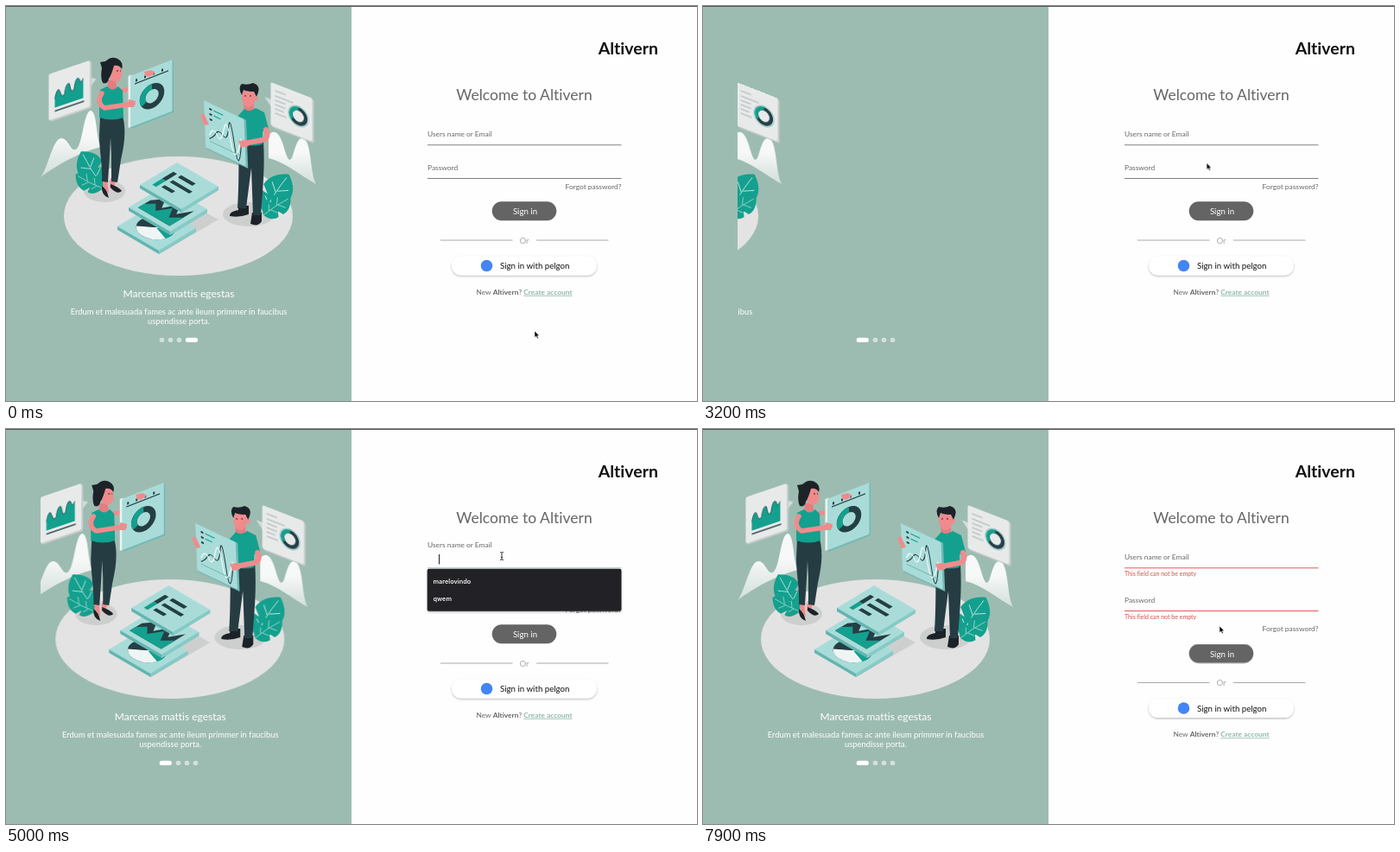
An HTML page that plays this animation: 800 px wide and 457 px high, repeating every 8000 ms.

```html
<!DOCTYPE html>
<html lang="en">
<head>
<meta charset="utf-8">
<title>Sign in</title>
<style>
html, body { margin: 0; width: 100%; height: 100%; overflow: hidden; background: #fefefe; }
svg { display: block; width: 100vw; height: 100vh; font-family: Lato, sans-serif; font-variant-ligatures: none; }
text { white-space: pre; }
.mid { text-anchor: middle; }
.label { font-size: 8.4px; fill: #666; }
.error { font-size: 7px; fill: #dd4a4a; }
.title { font-size: 17.5px; fill: #666; text-anchor: middle; }
.note { font-size: 8.4px; fill: #666; text-anchor: middle; }
.note .b { font-weight: 700; }
.note .a { font-weight: 700; fill: #8fb8a8; text-decoration: underline; }
.btn { font-size: 9.7px; }
.line { stroke: #808080; stroke-width: 1; fill: none; }

/* carousel */
.slide { animation: slide 8s infinite; }
@keyframes slide {
  0%, 33.75% { transform: none; }
  45.4%, 52.2% { transform: translateX(-320px); }
  65.45%, 100% { transform: none; }
}
.dot { fill: #fff; height: 5.4px; width: 5.6px; opacity: .55; }
.first { animation: first 8s infinite; }
.inner { animation: inner 8s infinite; }
.last { animation: last 8s infinite; }
@keyframes first { 0%, 34% { width: 5.6px; opacity: .55; } 37.5%, 100% { width: 14.2px; opacity: 1; } }
@keyframes inner { 0%, 34% { transform: none; } 37.5%, 100% { transform: translateX(9px); } }
@keyframes last {
  0%, 34% { width: 14.2px; opacity: 1; transform: none; }
  37.5%, 100% { width: 5.6px; opacity: .55; transform: translateX(8.8px); }
}

/* --u: shift in the sign-up form, --e: shift made by the error lines */
.move { animation: move 8s infinite; }
@keyframes move {
  0%, 11.5% { transform: none; }
  16.5%, 30% { transform: translateY(var(--u)); }
  35%, 100% { transform: none; }
}
.push { animation: push 8s infinite; }
@keyframes push {
  0%, 81.9% { transform: none; }
  85.6%, 100% { transform: translateY(var(--e)); }
}
.in { animation: in 8s infinite; }
.up { animation: up 8s infinite; }
@keyframes in { 0%, 11.5% { opacity: 1; } 16.5%, 30% { opacity: 0; } 35%, 100% { opacity: 1; } }
@keyframes up { 0%, 11.5% { opacity: 0; } 16.5%, 30% { opacity: 1; } 35%, 100% { opacity: 0; } }
/* captions that switch at once */
.now { animation-timing-function: step-end; }
.in.now { animation-name: in-now; }
.up.now { animation-name: up-now; }
@keyframes in-now { 0% { opacity: 1; } 11.5% { opacity: 0; } 30% { opacity: 1; } }
@keyframes up-now { 0% { opacity: 0; } 11.5% { opacity: 1; } 30% { opacity: 0; } }
.error { animation: error 8s infinite; }
@keyframes error { 0%, 81.9% { opacity: 0; } 85.6%, 100% { opacity: 1; } }
.bad { animation: bad 8s infinite; }
@keyframes bad { 0%, 81.9% { stroke: #808080; } 85.6%, 100% { stroke: #e35b5b; } }
.focus { animation: focus 8s infinite; }
@keyframes focus {
  0%, 44.4% { stroke: #808080; }
  45%, 81.9% { stroke: #9fc0b5; }
  85.6%, 100% { stroke: #e35b5b; }
}
.float { animation: float 8s infinite; }
@keyframes float {
  0%, 44.4% { transform: none; }
  48.2%, 81.9% { transform: translateY(-14px); }
  85.6%, 100% { transform: none; }
}
.list, .caret, .arrow, .hand, .beam { animation: list 8s step-end infinite; }
@keyframes list { 0% { opacity: 0; } 44.8% { opacity: 1; } 81.9% { opacity: 0; } }
.caret { animation-name: caret; }
@keyframes caret {
  0% { opacity: 0; }
  44.5% { opacity: 1; } 50.8% { opacity: 0; }
  57% { opacity: 1; } 63.3% { opacity: 0; }
  69.5% { opacity: 1; } 75.8% { opacity: 0; }
}

/* pointer */
.pointer { animation: pointer 8s infinite ease-in-out; }
@keyframes pointer {
  0%, 1% { transform: translate(612px, 376px); }
  9.4%, 23% { transform: translate(621px, 332px); }
  28.1%, 34.8% { transform: translate(632px, 366px); }
  42%, 73% { transform: translate(574px, 147px); }
  80%, 100% { transform: translate(598px, 228px); }
}
.arrow { animation-name: arrow; }
.hand { animation-name: hand; }
.beam { animation-name: beam; }
@keyframes arrow { 0% { opacity: 1; } 8% { opacity: 0; } 35.5% { opacity: 1; } 40.5% { opacity: 0; } 75% { opacity: 1; } 79.2% { opacity: 0; } 84% { opacity: 1; } }
@keyframes hand { 0% { opacity: 0; } 8% { opacity: 1; } 35.5% { opacity: 0; } 79.2% { opacity: 1; } 84% { opacity: 0; } }
@keyframes beam { 0% { opacity: 0; } 40.5% { opacity: 1; } 75% { opacity: 0; } }
</style>
</head>
<body>
<svg viewBox="0 0 800 457">
<defs>
  <clipPath id="view"><rect x="40" y="30" width="320" height="345"/></clipPath>
  <linearGradient id="fade" x1="0" y1="0" x2="0" y2="1">
    <stop offset=".4" stop-color="#f7f8f8"/><stop offset="1" stop-color="#e9eeec" stop-opacity=".7"/>
  </linearGradient>
  <filter id="soft" x="-10%" y="-30%" width="120%" height="180%">
    <feDropShadow dx="0" dy="1.2" stdDeviation="1.3" flood-opacity=".28"/>
  </filter>
  <g id="leaf">
    <path d="M0 0C-10-3-17-10-16-18L-8-18L-17-24C-17-33-12-41-1-47C10-41 15-33 14-25L6-21L14-17C14-10 9-3 0 0Z" fill="#14a08e"/>
    <path d="M0 0Q-3-22-1-43M-1-10L-9-15M-2-24L-11-31M-1-13L8-19M-1-26L8-33" fill="none" stroke="#bfe5df" stroke-width=".8"/>
  </g>
  <g id="sheet">
    <path d="M0 0L7-7.800H107V92.200L100 100Z" fill="#63b5b0"/>
    <path d="M100 0L107-7.800V92.200L100 100Z" fill="#86cac6"/>
    <rect width="100" height="100" fill="#a9dcd9"/>
  </g>
</defs>

<rect width="400" height="457" fill="#9dbcb1"/>

<g clip-path="url(#view)"><g class="slide">
  <ellipse cx="199.500" cy="243" rx="132.500" ry="69" fill="#e3e3e3"/>
  <g fill="#cdcfcf">
    <ellipse cx="114" cy="214" rx="24" ry="13"/>
    <ellipse cx="281" cy="241" rx="30" ry="14"/>
    <path d="M181 285L246 247L222 234L150 262Z"/>
  </g>

  <!-- waves -->
  <path d="M40 198C48 190 54 153 64 153C73 153 75 171 82 165C89 158 90 122 98 121C106 122 104 155 110 163C90 168 64 180 40 198Z" fill="url(#fade)"/>
  <path d="M304 150C310 141 317 147 321 161C325 175 328 184 332 173C336 160 339 149 346 154C354 163 352 193 359 206C342 197 324 181 304 176Z" fill="url(#fade)"/>

  <!-- left card -->
  <g transform="matrix(1 -.34 0 1 49.500 79)">
    <path d="M48 20L55 24L48 31Z" fill="#d6d9d9"/>
    <rect x="1.500" y="1.500" width="48" height="54" rx="2" fill="#c8cdcd"/>
    <rect width="47.500" height="53.500" rx="2" fill="#e8eaea"/>
    <path d="M7 41V31Q9 19 12 22L15 30H18Q20 15 24 19L26 28H29Q31 12 35 17L37 22L40 18V41Z" fill="#14a08e"/>
    <path d="M7 31Q9 19 12 22L15 30H18Q20 15 24 19L26 28H29Q31 12 35 17L37 22L40 18" fill="none" stroke="#243f45" stroke-width=".7"/>
    <path d="M7 45H41" stroke="#243f45" stroke-width="1.300"/>
  </g>

  <!-- right card -->
  <g transform="matrix(1 .39 0 1 306.500 88)">
    <path d="M1 20L-7 20L1 29Z" fill="#d6d9d9"/>
    <rect x="1.500" y="1" width="48.500" height="50.500" rx="2" fill="#c8cdcd"/>
    <rect width="48" height="50" rx="2" fill="#e8eaea"/>
    <path d="M5 8H17M5 14H26M5 19H17M5 24H17M5 29H15M5 34H18" stroke="#b9c1c1" stroke-width="1.300"/>
    <circle cx="32" cy="27" r="8.500" fill="none" stroke="#243f45" stroke-width="4"/>
    <path d="M32 18.500A8.500 8.500 0 0 0 25 32" fill="none" stroke="#14a08e" stroke-width="4"/>
    <circle cx="32" cy="27" r="11.500" fill="none" stroke="#8cc9c4"/>
  </g>

  <!-- plants -->
  <use href="#leaf" transform="translate(112 208) rotate(-31) scale(1)"/>
  <use href="#leaf" transform="translate(112 211) rotate(-62) scale(.75)"/>
  <use href="#leaf" transform="translate(299 239) rotate(34) scale(1.120)"/>
  <use href="#leaf" transform="translate(298 242) rotate(58) scale(.8)"/>

  <!-- stacked sheets -->
  <g transform="matrix(.48 .28 .43 -.26 129 255)">
    <use href="#sheet"/>
    <circle cx="50" cy="47" r="35" fill="#243f45"/>
    <path d="M50 47L23 25A35 35 0 0 1 83 35Z" fill="#eef5f4"/>
    <path d="M50 47L83 35A35 35 0 0 1 62 80Z" fill="#14a08e"/>
    <path d="M50 47L23 25M50 47L83 35M50 47L62 80" stroke="#fff" stroke-width="2.500"/>
  </g>
  <g transform="matrix(.48 .28 .43 -.26 142 233)">
    <use href="#sheet"/>
    <path d="M12 12H88V78L72 48L58 76L42 42L28 68L12 45Z" fill="#243f45"/>
    <path d="M12 12H88V50L70 30L56 56L40 28L26 44L12 28Z" fill="#14a08e"/>
  </g>
  <g transform="matrix(.48 .28 .43 -.26 155 207)">
    <use href="#sheet"/>
    <path d="M19 17V44" stroke="#14a08e" stroke-width="9"/>
    <path d="M19 44V74M31 28H56M31 50H78M31 72H66" stroke="#243f45" stroke-width="9"/>
  </g>

  <!-- woman -->
  <path d="M121 199L127 200L125 214L120 210ZM111 199L117 200L119 217L113 210Z" fill="#f08b8d"/>
  <path d="M111 208Q117 212 119 222Q110 219 111 208ZM121 206Q130 209 134 214Q129 219 121 210Z" fill="#1c2328"/>
  <path d="M109 127L135 127C140 145 136 165 133 178L129 204L122 203L122 172L121 152L120 172L118 204L111 203C112 185 108 168 108 150Z" fill="#263c43"/>
  <path d="M133 98L145 96L162 81" fill="none" stroke="#f08b8d" stroke-width="5" stroke-linejoin="round"/>
  <path d="M118 86H127L129 98L117 99Z" fill="#e27d81"/>
  <path d="M109 97L117 93Q123 100 130 93L135 98L136 129Q122 134 108 129L108 113Z" fill="#14a08e"/>
  <ellipse cx="127" cy="78" rx="7.500" ry="10" fill="#f08b8d"/>
  <path d="M112 89Q109 83 111 72L109 65L115 64Q124 56 132 63Q136 67 134 73Q131 68 125 69Q122 80 119 84Q118 91 112 89Z" fill="#1c2328"/>
  <path d="M128 75H130M132 75H133" stroke="#1c2328"/>
  <g transform="matrix(1 -.39 0 1 144 81)">
    <rect x="-2.500" y="-1" width="4" height="60" fill="#e7f4f3"/>
    <rect x="1" y="1.500" width="49" height="60" fill="#70b9b5"/>
    <rect width="48.500" height="59.500" rx="1" fill="#a9dcd9"/>
    <path d="M5 11H44" stroke="#243f45" stroke-width="1.300"/>
    <path d="M7 6V9M17 6V9M27 6V9M37 6V9" stroke="#243f45" stroke-width="2"/>
    <circle cx="25" cy="33" r="11" fill="none" stroke="#243f45" stroke-width="6.500"/>
    <path d="M25 22A11 11 0 0 0 16 39" fill="none" stroke="#14a08e" stroke-width="6.500"/>
  </g>
  <path d="M111 101Q104 112 114 118L147 113" fill="none" stroke="#f08b8d" stroke-width="5.500" stroke-linecap="round" stroke-linejoin="round"/>
  <path d="M142 108L150 110L148 117L141 117Z" fill="#f08b8d"/>
  <path d="M160 76L168 74L173 77L166 82L161 81Z" fill="#f08b8d"/>

  <!-- man -->
  <path d="M269 231H281V241Q270 245 259 243Q258 238 269 236ZM285 239H296V249Q292 256 283 252Z" fill="#1c2328"/>
  <path d="M270 154L298 156C300 187 297 215 295 242L286 242L284 187L278 234L268 234C270 205 269 180 270 154Z" fill="#263c43"/>
  <path d="M275 110H287V123H276Z" fill="#e27d81"/>
  <path d="M268 128L276 119Q282 124 289 118L299 123L304 142L297 145V160Q283 164 269 158Z" fill="#14a08e"/>
  <ellipse cx="281" cy="106" rx="8" ry="11" fill="#f08b8d"/>
  <path d="M273 103Q268 94 273 90Q280 92 286 89Q295 92 292 100L290 105L287 99Q279 99 275 97Z" fill="#1c2328"/>
  <path d="M276 104H278M282 104H284" stroke="#1c2328"/>
  <circle cx="290" cy="107" r="2.300" fill="#f08b8d"/>
  <g transform="matrix(1 .47 .04 1 229 109)">
    <rect x="1" y="0" width="48" height="56" fill="#70b9b5"/>
    <rect width="46.500" height="54.500" rx="1" fill="#a9dcd9"/>
    <path d="M6 7H9M6 13H9M6 19H9" stroke="#243f45" stroke-width="2.200"/>
    <path d="M11 7H22M11 13H19" stroke="#14a08e" stroke-width="1.300"/>
    <path d="M5 42Q10 38 13 32T21 31T28 18T34 35T42 33" fill="none" stroke="#243f45" stroke-width="1.100"/>
    <path d="M5 38Q10 25 14 34T22 24T30 34T42 25" fill="none" stroke="#f1f9f8" stroke-width="1.200"/>
    <path d="M5 45H42" stroke="#6ab6b0"/>
  </g>
  <path d="M301 143Q305 153 297 155L276 159" fill="none" stroke="#f08b8d" stroke-width="6" stroke-linecap="round" stroke-linejoin="round"/>
  <path d="M269 156L279 155L281 162L272 164Z" fill="#f08b8d"/>
  <path d="M225 127L229 124L235 137L230 138Z" fill="#f08b8d"/>

  <g class="mid" fill="#fff">
    <text x="200" y="337" font-size="12">Marcenas mattis egestas</text>
    <g font-size="9.400">
      <text x="200" y="357">Erdum et malesuada fames ac ante ileum primmer in faucibus</text>
      <text x="200" y="368">uspendisse porta.</text>
    </g>
  </g>
</g></g>

<rect class="dot first" x="177.700" y="383.700" rx="2.700"/>
<rect class="dot inner" x="187.700" y="383.700" rx="2.700"/>
<rect class="dot inner" x="197.700" y="383.700" rx="2.700"/>
<rect class="dot last" x="207.900" y="383.700" rx="2.700"/>

<!-- form -->
<text x="755" y="55.500" text-anchor="end" font-size="19.500" font-weight="700" fill="#111">Altivern</text>

<g class="move" style="--u:-24.500px">
  <text class="title in" x="600" y="109">Welcome to Altivern</text>
  <text class="title up" x="600" y="109">Getting Started</text>
  <g class="up">
    <text class="label" x="488" y="147">Full Name</text>
    <path class="line" d="M488 156.500H712.500"/>
  </g>
</g>

<g class="move" style="--u:8px">
  <text class="label float" x="488" y="151.300">Users name or Email</text>
  <path class="line focus" d="M488 160.800H712.500"/>
  <text class="error" x="488" y="170.200">This field can not be empty</text>
  <g class="push" style="--e:11px">
    <g class="label">
      <text class="in now" x="488" y="189.800">Password</text>
      <text class="up now" x="488" y="189.800">Create Password</text>
    </g>
    <path class="line bad" d="M488 199.500H712.500"/>
    <text class="error" x="488" y="208.700">This field can not be empty</text>
  </g>
  <g class="push" style="--e:22.500px">
    <text class="label in" x="712.500" y="211.500" text-anchor="end">Forgot password?</text>
  </g>
</g>

<g class="push" style="--e:22.500px">
  <rect x="562.700" y="226.300" width="74.600" height="22" rx="11" fill="#646464"/>
  <g class="btn mid" fill="#fff">
    <text class="in now" x="601" y="241">Sign in</text>
    <text class="up now" x="600" y="241">Sign up</text>
  </g>
  <path class="line" d="M503 271H586.500M614 271H697.500" style="stroke:#aaa"/>
  <text class="mid" x="600" y="274.500" font-size="9.700" fill="#aaa">Or</text>
  <rect x="516" y="289.500" width="168" height="22" rx="11" fill="#fff" filter="url(#soft)"/>
  <g class="btn" fill="#111">
    <g class="in now"><circle cx="556.500" cy="300.500" r="6.800" fill="#4285f4"/><text x="572" y="304">Sign in with pelgon</text></g>
    <g class="up now"><circle cx="555" cy="300.500" r="6.800" fill="#4285f4"/><text x="570" y="304">Sign up with pelgon</text></g>
  </g>
  <text class="note in" x="600" y="333.800">New <tspan class="b">Altivern</tspan>? <tspan class="a">Create account</tspan></text>
  <g class="up">
    <text class="note" x="600" y="333.800">By signing up, you agree to <tspan class="b">Altivern</tspan></text>
    <text class="note" x="600" y="344.800"><tspan class="a">Terms of Conditions</tspan> and <tspan class="a">Privacy policy</tspan></text>
    <text class="note" x="600" y="369.500">Already on <tspan class="b">Altivern</tspan>? <tspan class="a">Log in</tspan></text>
  </g>
</g>

<path class="caret" d="M501.500 145V156.500" stroke="#222"/>
<g class="list">
  <rect x="487.700" y="161.700" width="224.800" height="49" rx="2" fill="#212325" filter="url(#soft)"/>
  <g font-family="Inter, sans-serif" font-size="7.300" font-weight="600" fill="#f0f0f0">
    <text x="494.500" y="179">marelovindo</text>
    <text x="494.500" y="199">qwem</text>
  </g>
</g>

<rect width="800" height="1" fill="#555"/>

<g class="pointer">
  <path class="arrow" d="M0 0V7.500L1.800 5.900L3 8.700L4.300 8.100L3.100 5.400H5.400Z" fill="#000" stroke="#fff" stroke-width=".5"/>
  <path class="hand" d="M-.5.300Q.5-1 1.500.3V3L4.800 3.600Q6 4.200 5.600 6L4.500 9.200H0L-3.300 5.300Q-3.200 4-.5 5.600Z" fill="#fff" stroke="#222" stroke-width=".9" stroke-linejoin="round"/>
  <path class="beam" d="M-2-4.500Q0-4.500 0-3.500Q0-4.500 2-4.500M0-3.500V3.500M-2 4.500Q0 4.500 0 3.500Q0 4.500 2 4.500M-1 1.500H1" fill="none" stroke="#222" stroke-width=".9"/>
</g>
</svg>
</body>
</html>
```
